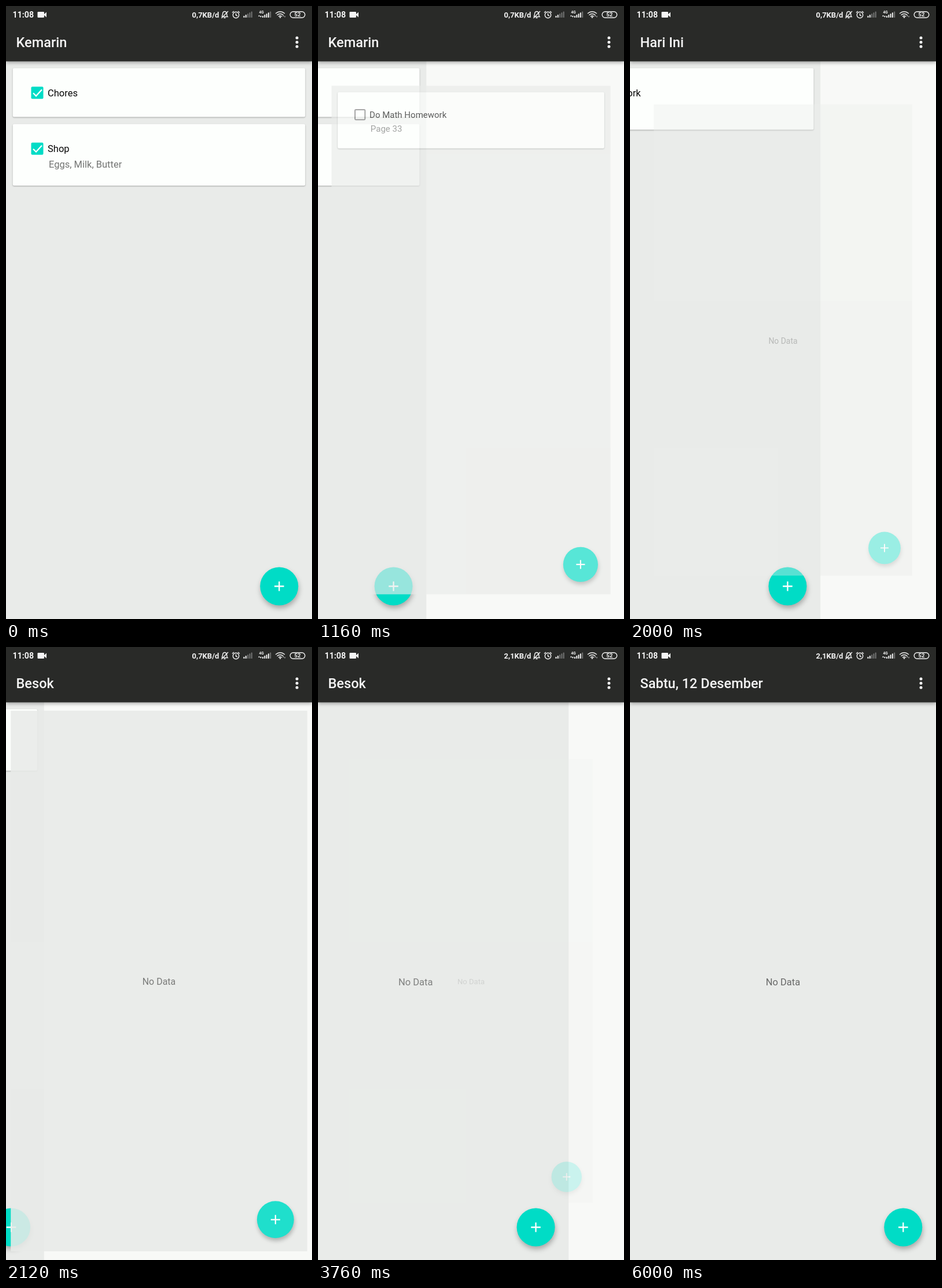
Recreate the animation shown at these times as an HTML page. Size 529 by 1058 pixels, loop 6.28 s.

```html
<!DOCTYPE html>
<html lang="id">
<head>
<meta charset="utf-8">
<title>To-do days</title>
<style>
  html, body { margin: 0; width: 100%; height: 100%; overflow: hidden; background: #f8f9f7; }
  svg { display: block; width: 529px; height: 1058px; font: 16.5px Roboto, sans-serif; }
  .card { fill: #fdfffd; filter: drop-shadow(0 1.5px 1px rgba(0,0,0,.3)); }
  .fab { fill: #00dcc6; filter: drop-shadow(1px 5px 4px rgba(0,0,0,.28)); }
  .bar { fill: #292a28; filter: drop-shadow(0 2px 3px rgba(0,0,0,.35)); }
  .note { fill: #737473; }
  .line { fill: none; stroke: #f2f2f2; stroke-width: 1.4; }
  #title { font-size: 23.56px; font-weight: 500; }
  #status { font-weight: 700; }
</style>
</head>
<body>
<svg viewBox="0 0 529 1058">
  <g id="pages"></g>
  <rect class="bar" width="529" height="95.5"/>
  <g fill="#f5f5f5">
    <text id="title" x="17.5" y="71.3"></text>
    <circle cx="503" cy="55" r="2.5"/><circle cx="503" cy="62.5" r="2.5"/><circle cx="503" cy="70" r="2.5"/>
    <g id="status">
      <text x="11.5" y="20" font-size="14.2">11:08</text>
      <rect x="54.5" y="10" width="11.5" height="10" rx="1.2"/>
      <path d="M65 15L70 10.500V19.500Z"/>
      <text id="rate" x="321.500" y="19.700" font-size="13"></text>
      <path class="line" d="M373 18.500H383C381.500 17 382 15 381.500 12.500C380.500 8.500 375.500 8.500 374.700 12.500C374.300 15 374.500 17 373 18.500M376.500 20.500H379.500M372.500 21L384 9"/>
      <circle class="line" cx="397.500" cy="15.500" r="5.200"/>
      <path class="line" d="M397.500 12.500V16L400 17M391 11.500L394 9M401 9L404 11.500"/>
      <g id="bars"></g>
      <text x="437.500" y="12.600" font-size="6.500">4G</text>
      <path d="M436 18L437.500 15.500L439 18ZM439 17L440.500 20L442 17Z"/>
      <path class="line" stroke-width="1.800" d="M466 13Q474 6.500 482 13M468.500 15.700Q474 11.200 479.500 15.700M471 18.300Q474 15.800 477 18.300"/>
      <circle cx="474" cy="19.500" r="1.300"/>
      <path fill="#999" d="M478 18L479.500 15.500L481 18ZM480.500 17.500L482 20L483.500 17.500Z"/>
      <rect class="line" x="491.200" y="9.700" width="25.600" height="10.600" rx="5.300"/>
      <text x="504" y="18.400" font-size="9.500" text-anchor="middle">52</text>
    </g>
  </g>
</svg>
<script>
const W = 529, MID_X = 264.5, MID_Y = 576.5, LOOP = 6280, STEP = 40;
const $ = id => document.getElementById(id);

const card = (y, h, label, note, done) => `
  <rect class="card" x="11.7" y="${y}" width="505.600" height="${h}" rx="2.500"/>
  ${done
    ? `<rect x="43.500" y="${y + 32}" width="21" height="21" rx="2" fill="#00dcc6"/>
       <path d="M47 ${y + 43}l5 5L62 ${y + 37}" fill="none" stroke="#fff" stroke-width="2.300"/>`
    : `<rect x="44.500" y="${y + 33}" width="19" height="19" rx="1.500" fill="none" stroke="#777" stroke-width="2.200"/>`}
  <text x="72" y="${y + 48.700}" fill="#080808">${label}</text>
  <text class="note" x="74" y="${y + 75}">${note}</text>`;

const empty = '<text x="264.500" y="583.700" text-anchor="middle" fill="#686968">No Data</text>';

const days = [
  ['Kemarin', card(107.3, 84.200, 'Chores', '', true) + card(203.700, 106.300, 'Shop', 'Eggs, Milk, Butter', true)],
  ['Hari Ini', card(107.3, 106.300, 'Do Math Homework', 'Page 33', false)],
  ['Besok', empty],
  ['Sabtu, 12 Desember', empty]
];

$('pages').innerHTML = days.map(([, body]) => `<g>
  <rect y="95" width="${W}" height="963" fill="#e9ebe9"/>${body}
  <circle class="fab" cx="472.300" cy="1001.500" r="33"/>
  <path d="M464 1001.500h16.600m-8.300 -8.300v16.600" stroke="#fff" stroke-width="2.300"/></g>`).join('');
const pages = [...$('pages').children];

const signal = (x, lit) => [0, 1, 2, 3, 4].map(i =>
  `<rect x="${x + i * 3.300}" y="${17 - i * 1.900}" width="2" height="${3 + i * 1.900}" rx=".6" fill="${i < lit ? '#f2f2f2' : '#747574'}"/>`).join('');
$('bars').innerHTML = signal(410.500, 2) + signal(443, 4);

// Each swipe: finger down, finger up, share dragged, settled
const swipes = [
  { start: 960, release: 1160, drag: .646, end: 1480 },
  { start: 1760, release: 2040, drag: .476, end: 2360 },
  { start: 3720, release: 3760, drag: .181, end: 4000 }
];

function progress(t, { start, release, drag, end }) {
  if (t <= start) return 0;
  if (t >= end) return 1;
  if (t <= release) return drag * ((t - start) / (release - start)) ** 1.5;
  return 1 - (1 - drag) * ((end - t) / (end - release)) ** 5;
}

function draw(now) {
  const t = Math.floor(now % LOOP / STEP) * STEP;
  const pos = swipes.reduce((sum, s) => sum + progress(t, s), 0);
  pages.forEach((page, i) => {
    const d = i - pos, scale = 1 - .25 * d;
    page.style.display = Math.abs(d) < 1 ? '' : 'none';
    page.setAttribute('opacity', d > 0 ? Math.max(0, 1 - d) : 1);
    page.setAttribute('transform', d > 0
      ? `translate(${MID_X} ${MID_Y}) scale(${scale}) translate(${-MID_X} ${-MID_Y})`
      : `translate(${d * W} 0)`);
  });
  $('title').textContent = days[swipes.filter(s => t > s.release).length][0];
  $('rate').textContent = t < 2480 ? '0,7KB/d' : '2,1KB/d';
}

const origin = performance.now();
function tick() {
  draw(performance.now() - origin);
  requestAnimationFrame(tick);
}
tick();
</script>
</body>
</html>
```
